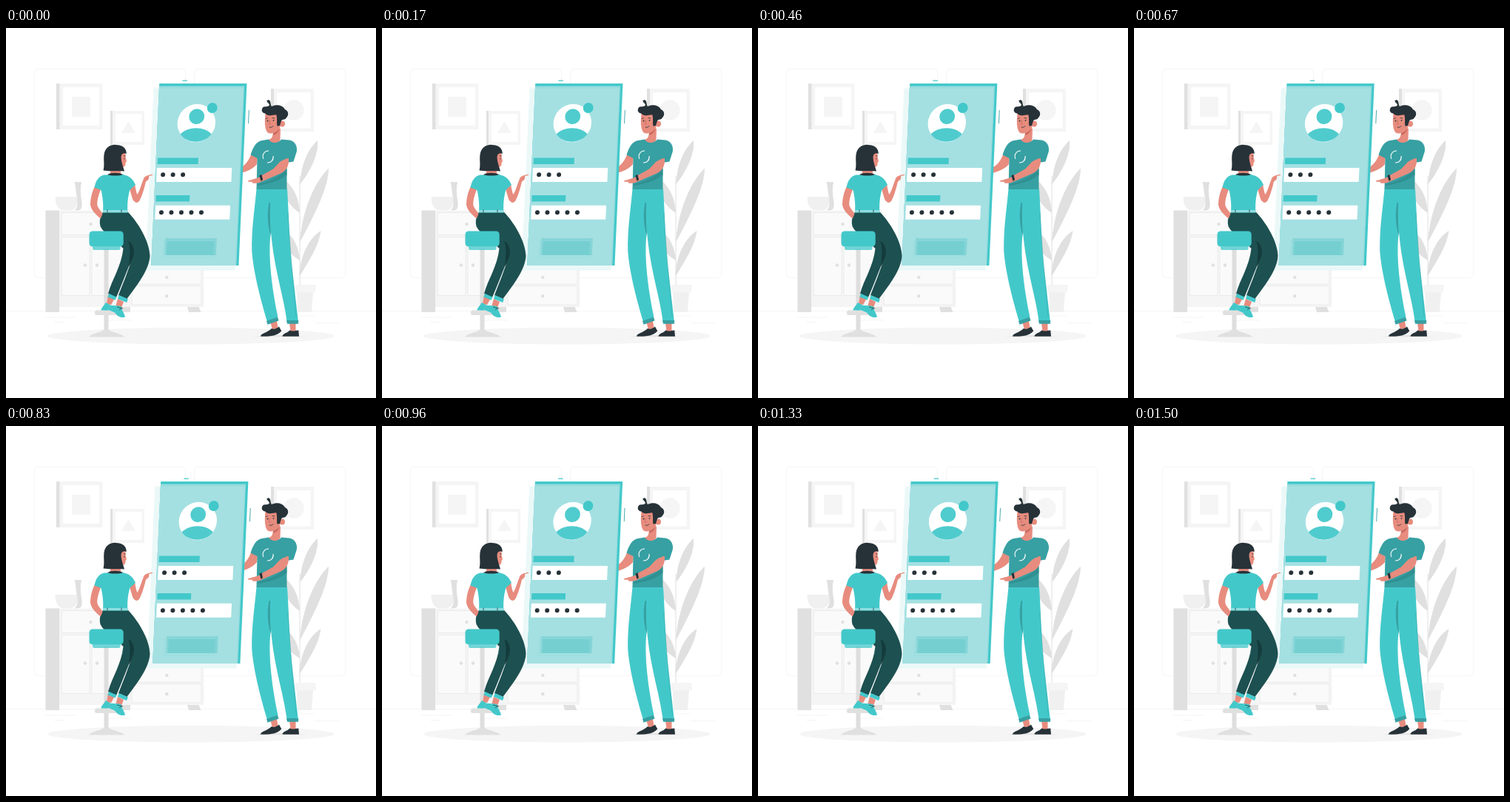
Animation, 500 px wide and 500 px high, one loop 1.54 s. Source, as an HTML page:

```html
<!DOCTYPE html>
<html lang="en">
<head>
<meta charset="utf-8">
<title>Login illustration</title>
<style>
  html, body { margin: 0; width: 100%; height: 100%; overflow: hidden; background: #fff; }
  svg { display: block; width: 100vw; height: 100vh; }
  .teal { fill: #43c8ca; }
  .deep { fill: #37a0a2; }
  .pants { fill: #1d5051; }
  .ink { fill: #263238; }
  .skin { fill: #e78c7e; }
  .white { fill: #fff; }
  .g1 { fill: #f5f5f5; }
  .g2 { fill: #f0f0f0; }
  .g3 { fill: #e0e0e0; }
  .line { fill: none; stroke: #ebebeb; stroke-width: .5; }
  .panel { fill: #fafafa; stroke: #e9e9e9; stroke-width: .8; }
  .thin { fill: none; stroke: #263238; stroke-width: .8; stroke-linecap: round; }
</style>
</head>
<body>
<svg viewBox="0 0 500 500">
  <g id="room">
    <path class="line" d="M0 382.5H500M52 391H96M131 395H170M65 397.5H80M417 398.5H450M397 389H416"/>
    <rect class="line" x="38.3" y="55.1" width="204.3" height="282.6" rx="5.6"/>
    <rect class="line" x="254.6" y="55.1" width="204.3" height="282.6" rx="5.6"/>

    <rect class="g3" x="68" y="75" width="6" height="62"/>
    <rect class="g1" x="72.5" y="75" width="58" height="62"/>
    <rect class="white" x="77" y="80" width="49" height="52"/>
    <rect class="g1" x="89" y="93" width="25" height="27"/>

    <rect class="g3" x="141" y="112" width="5" height="46"/>
    <rect class="g1" x="144" y="112" width="43" height="46"/>
    <rect class="white" x="148" y="116" width="35.5" height="38"/>
    <path class="g1" d="M165.5 126L175 142H156Z"/>

    <rect class="g3" x="358" y="82" width="5" height="58"/>
    <rect class="g1" x="362" y="82" width="54" height="58"/>
    <rect class="white" x="366" y="87" width="45.5" height="48.5"/>
    <circle class="g1" cx="389" cy="111" r="13.7"/>

    <path class="g2" d="M66.5 228H98C98 238 94 246 86 246.5H78C70 246 66.5 238 66.5 228Z"/>
    <path class="g3" d="M92.5 208H102C100 218 101 227 102.5 235C103.5 243 101 246.5 97 246.5H93C98 241 97 234 95.5 227C94 219 94.5 214 92.5 208Z"/>

    <rect class="g1" x="72" y="246.5" width="95" height="130.5"/>
    <rect class="g1" x="167" y="286" width="100.5" height="91"/>
    <rect class="g3" x="53.5" y="246.5" width="18.5" height="137.5"/>
    <path class="g3" d="M245 377H260.5L263.5 384H247Z"/>
    <path class="g3" d="M150 377H168V384H153Z"/>
    <rect class="panel" x="75.5" y="249.5" width="89" height="30"/>
    <rect class="panel" x="75.5" y="282.5" width="37.5" height="79"/>
    <rect class="panel" x="116" y="282.5" width="48.5" height="79"/>
    <rect class="panel" x="170" y="289" width="94" height="29"/>
    <rect class="panel" x="170" y="321" width="94" height="25"/>
    <rect class="panel" x="170" y="348.5" width="94" height="25.5"/>
    <g class="g3">
      <circle cx="114.5" cy="265" r="2.2"/><circle cx="107" cy="320.5" r="2.2"/>
      <circle cx="123" cy="320.5" r="2.2"/><circle cx="217.3" cy="337" r="2.2"/>
      <circle cx="217.3" cy="362.3" r="2.2"/>
    </g>

    <path d="M397 348V200" fill="none" stroke="#e0e0e0"/>
    <g class="g3">
      <path d="M397.5 211C398 186 408 163 421 152C423 170 411 194 397.5 211Z"/>
      <path d="M397 290C399 255 413 212 436 189.5C436 215 418 250 397 290Z"/>
      <path d="M396.5 336C397 310 408 285 425.5 274C423 294 411 312 396.5 336Z"/>
      <path d="M397 250C396 230 389 214 374 203C372 224 381 239 397 250Z"/>
      <path d="M397 314C396 295 388 281 374 271C372 290 381 305 397 314Z"/>
    </g>
    <path class="g2" d="M393 357H415L413 384H394Z"/>
    <rect class="g1" x="390.5" y="347" width="28" height="10.5"/>
    <ellipse class="g1" cx="250" cy="416.2" rx="193.9" ry="11.3"/>
  </g>

  <path class="skin" d="M332 169L340 175L339 184C334 190 326 194 314 197V190C324 186 328 179 332 169Z"/>

  <g id="phone">
    <g transform="matrix(1 0 -.0447 1 3.75 0)">
      <rect x="199.5" y="81.5" width="121" height="246" fill="#ebf8f8"/>
      <rect class="teal" x="207" y="75" width="118.2" height="246"/>
      <rect x="207" y="78.5" width="115" height="242.5" fill="#97dcde"/>
      <rect x="207" y="81.5" width="113.5" height="239.5" fill="#a4e0e2"/>
      <rect class="teal" x="238" y="70.5" width="6.5" height="1.3"/>
      <rect x="329.2" y="111" width="1" height="18" fill="#4aa9ab"/>
      <circle class="white" cx="259.5" cy="128.5" r="25.7"/>
      <circle class="teal" cx="259.5" cy="119.7" r="10.4" opacity=".93"/>
      <path class="teal" opacity=".93" d="M238.4 143.5C248 132.5 271 132.5 280.5 143.5C271 157 248 157 238.4 143.5Z"/>
      <circle class="teal" cx="280" cy="108" r="6.9"/>
      <rect class="teal" x="209.2" y="175.5" width="55" height="8.5"/>
      <rect class="white" x="208.8" y="189" width="101.3" height="19"/>
      <rect class="teal" x="209.2" y="226" width="45.7" height="8.6"/>
      <rect class="white" x="209.2" y="239.7" width="101" height="19"/>
      <g id="dots" class="ink"></g>
      <rect x="224.3" y="284" width="69.7" height="23" fill="#86d5d7"/>
      <rect x="227" y="288" width="64.5" height="19" fill="#75cfd1"/>
      <rect x="222.5" y="287.5" width="68" height="22.5" fill="none" stroke="#8fd8da" stroke-width=".6"/>
    </g>
  </g>

  <g id="man">
    <path d="M334 417.3C350 414.5 390 414.5 404 417.3Z" fill="#e3e3e3"/>
    <path class="skin" d="M357 397L366 395L367.5 406L360 407ZM383 398H391.5V410H384.5Z"/>
    <path class="ink" d="M359 406C362 408 366 406 369 403.5L372.3 409.5C366 416.5 356 417 344 416.7C344.5 412.5 353 412 359 406Z"/>
    <path class="ink" d="M383.5 408.5C387 410.5 391 409 395.3 408.5L396 416.7H373.5C374 412.5 380 412.5 383.5 408.5Z"/>
    <path class="teal" d="M338.5 217.5H380C382 245 382.5 285 387 328L394.8 396H379.5C375 361 362 325 358 275C354 303 358 346 367.5 390.5L353 397C342 360 334 326 332.3 302C331.5 272 336 246 338.5 217.5Z"/>
    <path class="deep" d="M355.5 236C352.5 250 353.5 268 358 281C356.8 265 356.5 250 357.2 236Z"/>
    <path class="deep" d="M352 396L367 390.5L368.5 395.5L353.5 400.7ZM379 395H395.2L395 399.7H380Z"/>
    <path d="M381 250C383 290 388 340 392 390" fill="none" stroke="#37a0a2" stroke-width=".4"/>

    <path class="skin" d="M361 136H371L370.5 150.5C370 157 355 157 355 150.5C360 150 361 146 361 136Z"/>
    <path class="deep" d="M346 152L355 150.5C359 157 368 156 372 150.5L383 151.5C391 153 394 160 392.8 167L388.5 180.5L379.5 182V218H338.5L339.5 176L330.5 171.5C333.5 162 338 153 346 152Z"/>
    <path d="M340 211C356 207 371 200 379.5 190V199C368 207 354 211 340 213Z" fill="#309092"/>
    <path d="M348 177A7.5 7.5 0 0 1 355 166M361 173A7.5 7.5 0 0 1 353 182" fill="none" stroke="#fff" stroke-width="1.1"/>

    <path class="skin" d="M370 181C374 178 379 176 382 176C383 188 377 194 370 197L348 206.5L345 199.5L361 190.5Z"/>
    <path class="skin" d="M346 200.5L337 203.5L326.7 206.5C326.3 208 330 208 333.5 207.7C331.5 209 333 210 336.5 209.8C341 210 345 208 348 206.5Z"/>
    <path class="ink" d="M342.5 199.5L345.5 198L347 205L344.5 207Z"/>

    <path class="skin" d="M350.5 115C349.5 125 349.5 132 351.5 138C353 143 358 143.5 362 141.5L370 136V115Z"/>
    <path d="M361 142C364 141.2 367 139 369 136.5C368.5 140.5 365.5 144 361 144.5Z" fill="#c9685f"/>
    <circle class="skin" cx="373" cy="129.5" r="4"/>
    <path class="ink" d="M346 109.5C347 104.5 352 107.5 355.5 105C357 102.500 353 101 352.5 99C352.300 97.5 354 96.800 355.5 97.300C358.5 99.5 357 104 359 106C365 102.5 374 104 377 110C382 112 382.5 118 379 121C378 124.500 374 122.500 372 125.500L370 132L366.5 132.500C365.5 127 367 121 365 117C358 118.5 353 119 350.5 115.5C346.5 115 345 112 346 109.5Z"/>
    <circle class="ink" cx="353.5" cy="125.5" r=".9"/><circle class="ink" cx="361.5" cy="124.8" r=".9"/>
    <path class="thin" d="M351.5 122.5L353.5 121.7M360 121.5L363 122M356 134C358 135 360 134 361 132.5"/>
    <path d="M356.5 124L355.5 130H358" fill="none" stroke="#c9685f" stroke-width=".7"/>
  </g>

  <g id="stool">
    <rect x="132.5" y="298" width="6" height="113" fill="#dedede"/>
    <path class="g3" d="M132 408H139C144 412 155 412 160.5 417.5H111.5C117 412 127 412 132 408Z"/>
    <rect class="g3" x="120" y="381.5" width="32" height="6.5" rx="2.5"/>
  </g>

  <g id="woman">
    <path class="skin" d="M138 361L147 365L142 374L136 373ZM151 366L159 370L156 378L148.5 375Z"/>
    <path class="teal" d="M134.5 371L140.500 374L138.500 381.5H128.5C129 377 132.500 376 134.5 371Z"/>
    <path class="teal" d="M140 374.5C146 375.500 152 374.5 156 376.5C156 382 160 385 161 390.5C155 392.5 150 389 147 384.5L138.500 381Z"/>
    <path d="M150 377L158 379M153 381L157 378" fill="none" stroke="#263238" stroke-width=".7"/>
    <path class="pants" d="M131 249H165C178 262 194 288 194.5 308C193.500 328 175 350 163.5 366L152 361C158 345 165 329 170 312L166 322C160 337 155 350 149 364L138 359C143 340 156 322 158.500 298C146 285 133 279 127.5 268C125.5 260 128 253 131 249Z"/>
    <path d="M165.500 288C171 291 174 299 172.500 306C171 313 168.500 318 165.500 323C168 311 168.500 299 165.500 288Z" fill="#143b3c"/>
    <path class="teal" d="M139 359L149.5 363.5L147.5 367.5L137.3 363.5ZM152.5 361L165 366.5L163 371L151 366Z"/>

    <path class="skin" d="M120 214L128.5 217C125 226 122.5 234 123.5 240C125.5 245 129 248 130.5 251L128 257.5C122 253 115 246 114 239C114 230 116.5 221 120 214Z"/>
    <path class="skin" d="M166 214L174 210C175 217 176 222 177.5 225C181 219 183 211 185.5 205C186.5 200.5 190 199 198 197.7C199 198.8 197 199.2 193 200C194 203 192.5 206 189 207.5C187 216 184 227 180 234C176.5 238 173 235 171 231Z"/>
    <path class="skin" d="M141 188H155V200H141Z"/>
    <path class="teal" d="M133 198.5L158 198C168 200 172 205 175 212L167.5 218.5C165 226 163.5 238 164.5 249.5H131C132 238 130.5 227 128.5 219L119.5 215.5C121 207 125 200 133 198.5Z"/>
    <path d="M131 246H164.5V249.3H131Z" fill="#8edee0"/>
    <path class="ink" d="M137 198.3C141 195 153 195 158 198C154 200 142 200 137 198.3Z"/>
    <path class="thin" d="M137 246V249M156 246V249" stroke-width=".5"/>
    <path class="skin" d="M153 165C159 164 162.5 169 161.7 175L163 180L161.5 182C162 188 158 189 153 187Z"/>
    <path class="ink" d="M132.500 171C134 161 142 157 149 158C157 158 163 162 162.7 170C159 168 156 170 155.5 174C155.5 181 158.5 188 160 193.5C151 192.5 140 194 131.5 192.5C133.5 185 131.5 178 132.500 171Z"/>
    <path class="thin" d="M159.5 173L161 172.7M160 176V177"/>
  </g>

  <rect class="teal" x="117" y="293" width="37.5" height="7" rx="2.5" opacity=".75"/>
  <rect class="teal" x="112.5" y="274.5" width="46.2" height="20.7" rx="4.5"/>
</svg>
<script>
  const LOOP = 1540, SHAKE = 1500, LEAD = 25, FPS = 24;
  const stops = [0, -1, 2, -4, 4, -4, 4, -4, 2, -1, 0];
  const phone = document.getElementById('phone');
  const dots = document.getElementById('dots');

  function addDots(count, x, y) {
    for (let i = 0; i < count; i++) {
      dots.insertAdjacentHTML('beforeend',
        `<circle cx="${x + i * 13.5}" cy="${y}" r="3"/>`);
    }
  }

  // Linear shake between evenly spaced stops
  function shake(ms) {
    const p = Math.min(ms / SHAKE, 1) * (stops.length - 1);
    const i = Math.min(Math.floor(p), stops.length - 2);
    return stops[i] + (stops[i + 1] - stops[i]) * (p - i);
  }

  function draw(now) {
    const step = Math.min(Math.floor((now % LOOP + 5) * FPS / 1000), 36);
    const x = shake(step * 1000 / FPS + LEAD);
    phone.setAttribute('transform', `translate(${x.toFixed(3)} 0)`);
    requestAnimationFrame(draw);
  }

  addDots(3, 217.4, 198.3);
  addDots(5, 217.5, 249.3);
  draw(0);
</script>
</body>
</html>
```
